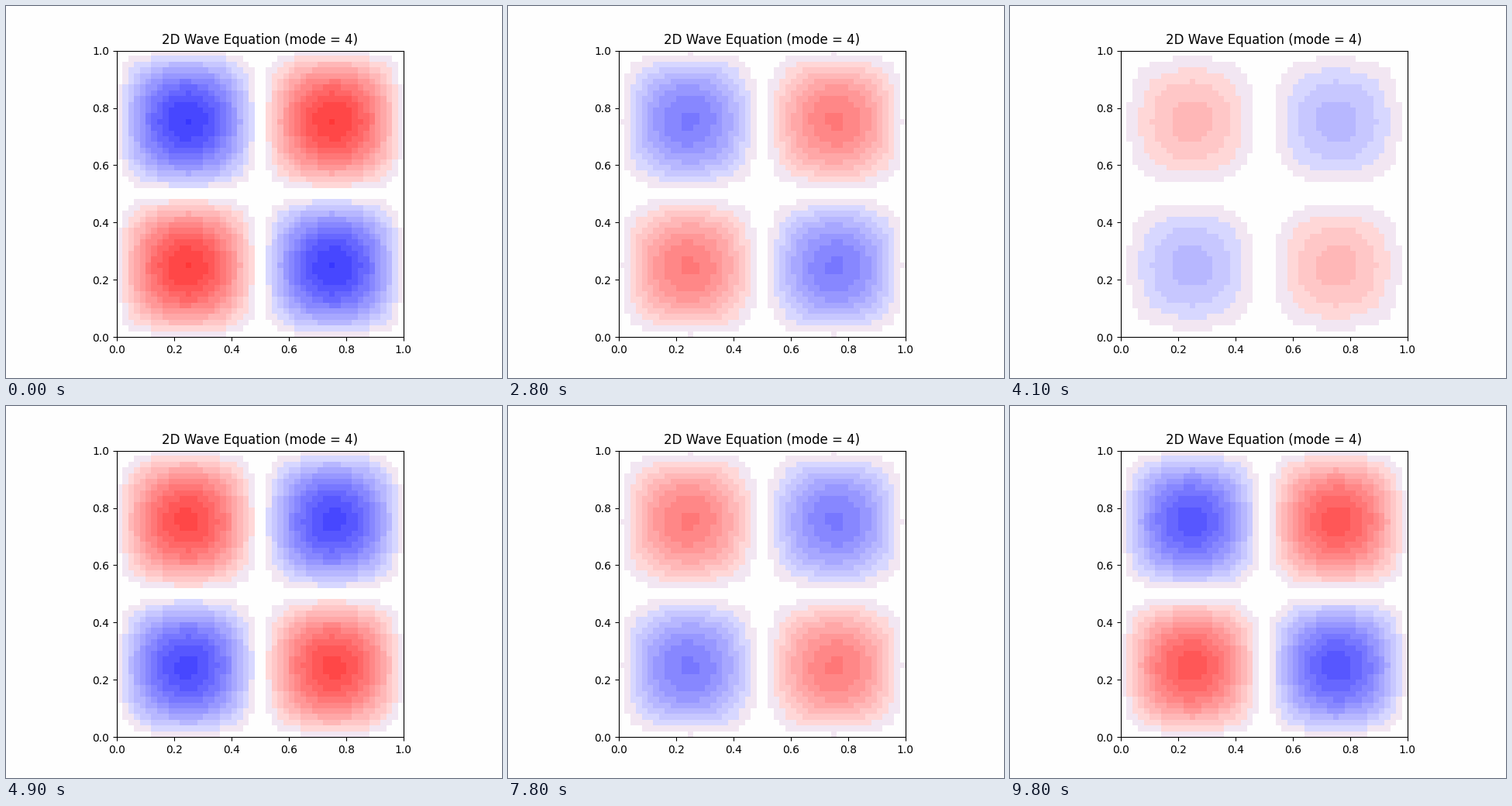
Recreate the animation shown at these times as a matplotlib script. Size 640x480 px, loop 9.9 s.

```python
import numpy as np
import matplotlib.pyplot as plt
from matplotlib.animation import FuncAnimation

CELLS = 50
FRAMES = 99
PERIOD = 100       # frames per oscillation
PEAK = 11.5        # frame position of the first crest
LEVELS = 16        # colour steps from rest to full deflection
PAPER = (254, 254, 254)


def make_palette():
    """Colours for levels -15..15: blue, near white, red."""
    palette = np.full((2 * LEVELS - 1, 3), 255, dtype=np.uint8)
    rest = LEVELS - 1
    for k in range(1, LEVELS):
        tint = 247 - 16 * k
        palette[rest + k] = (255, tint, tint)
        palette[rest - k] = (tint, tint, 255)
    # The faintest step is one shared tint on both sides.
    palette[rest - 1] = palette[rest + 1] = (242, 230, 242)
    palette[rest] = PAPER
    return palette


# Second eigenvector along each axis, sampled on interior grid points.
profile = np.sin(2 * np.pi * np.arange(1, CELLS + 1) / (CELLS + 1))
profile /= np.abs(profile).max()
mode = np.outer(profile, profile)
palette = make_palette()


def membrane(frame):
    u = mode * np.cos(2 * np.pi * (frame - PEAK) / PERIOD)
    level = np.sign(u) * np.minimum(np.floor(np.abs(u) * LEVELS), LEVELS - 1)
    return palette[level.astype(int) + LEVELS - 1]


paper = tuple(c / 255 for c in PAPER)
plt.rcParams["font.family"] = "DejaVu Sans"
fig, ax = plt.subplots(figsize=(6.4, 4.8), dpi=100, facecolor=paper)
ax.set_facecolor(paper)
image = ax.imshow(membrane(0), extent=(0, 1, 0, 1), origin="lower",
                  interpolation="nearest")
ax.set_title("2D Wave Equation (mode = 4)")


def update(frame):
    image.set_data(membrane(frame))
    return (image,)


anim = FuncAnimation(fig, update, frames=FRAMES, interval=100, repeat=True)
plt.show()
```
